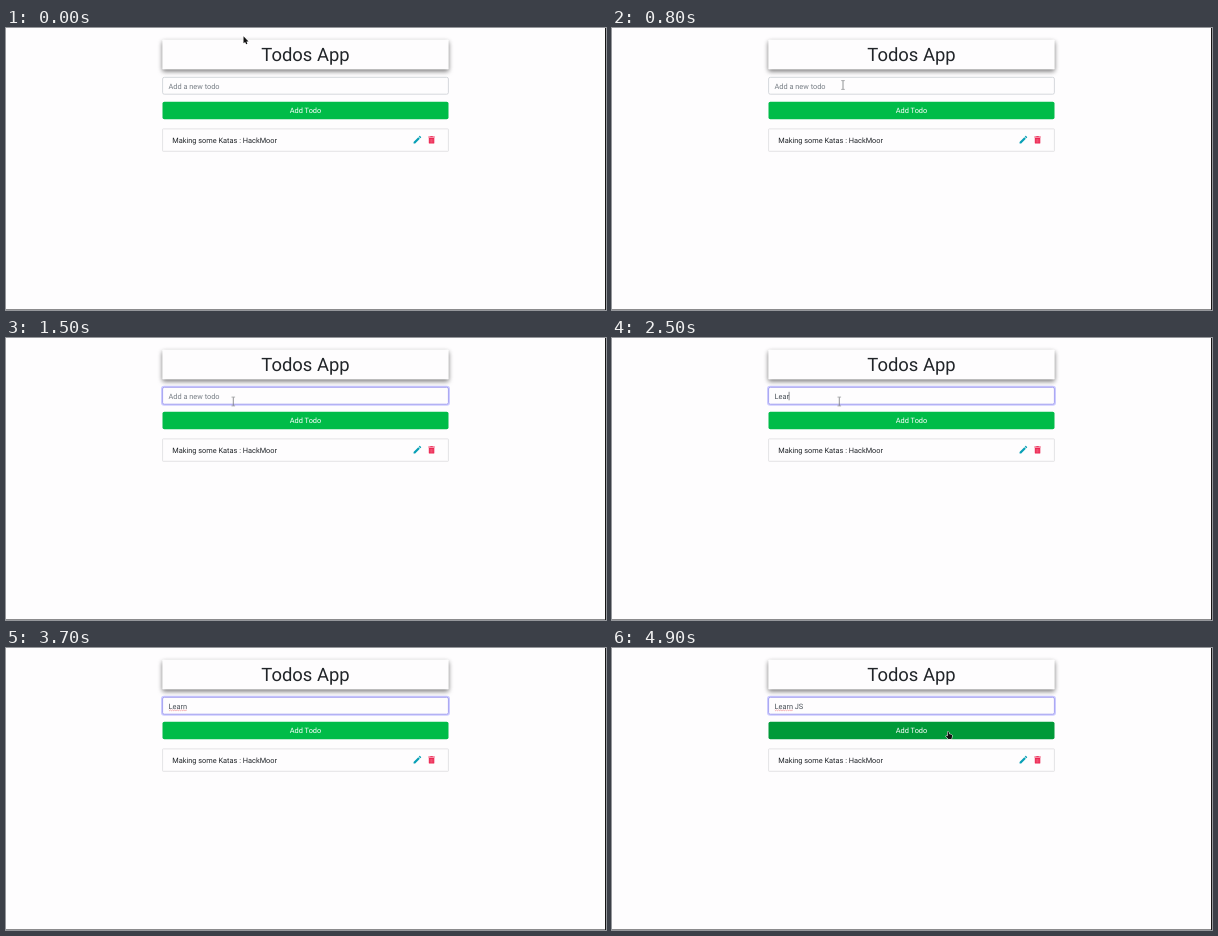
Animation of 600x282 px, one loop 5 s. Source, as an HTML page with a canvas:

```html
<!DOCTYPE html>
<html lang="en">
<head>
<meta charset="utf-8">
<title>Todos App</title>
<style>
html, body { margin: 0; width: 100%; height: 100%; overflow: hidden; background: #fefdfe; }
canvas { display: block; width: 600px; height: 282px; }
</style>
</head>
<body>
<canvas id="stage"></canvas>
<script>
const W = 600, H = 282, LOOP = 5000;
const canvas = document.getElementById("stage");
const ctx = canvas.getContext("2d");
const ratio = window.devicePixelRatio || 1;
canvas.width = Math.round(W * ratio);
canvas.height = Math.round(H * ratio);

const BG = "#fefdfe", INK = "#212529";
const LEFT = 156.5, WIDTH = 286, FONT = 7.38, TEXT_X = 162.5;

// Each state holds until the next one starts.
const pointer = [
  [0, "arrow", 237.5, 8.3], [100, "arrow", 238, 10.5], [200, "arrow", 238, 13],
  [500, "arrow", 237, 21], [600, "arrow", 235, 34], [700, "beam", 233, 50],
  [800, "beam", 231, 57], [900, "beam", 229, 56], [1000, "beam", 227.5, 53],
  [1100, "beam", 227.3, 63.5], [3100, "none", 0, 0],
  [4600, "arrow", 323, 102], [4700, "arrow", 326, 92.7],
  [4800, "hand", 333, 85], [4900, "hand", 334.5, 83.3]
];
const typing = [
  [0, ""], [1800, "L"], [2100, "Le"], [2300, "Lea"], [2500, "Lear"],
  [2800, "Learn"], [3200, "Learn "], [3900, "Learn J"], [4000, "Learn JS"]
];
const caret = [[0, false], [1800, true], [3700, false], [3900, true], [4400, false]];
const button = [[0, "#00bc48"], [4800, "#00ab40"], [4900, "#009a38"]];

const at = (states, t) => states.filter(s => s[0] <= t).pop();

function text(str, x, y, color, size = FONT, align = "left") {
  ctx.font = `400 ${size}px Roboto, sans-serif`;
  ctx.textAlign = align;
  ctx.fillStyle = color;
  ctx.fillText(str, x, y);
}

function box(x, y, w, h, r, fill, stroke, line = 0.7) {
  ctx.beginPath();
  ctx.roundRect(x, y, w, h, r);
  if (fill) {
    ctx.fillStyle = fill;
    ctx.fill();
  }
  if (stroke) {
    ctx.strokeStyle = stroke;
    ctx.lineWidth = line;
    ctx.stroke();
  }
}

function line(points, color, width) {
  ctx.beginPath();
  points.forEach(([x, y]) => ctx.lineTo(x, y));
  ctx.strokeStyle = color;
  ctx.lineWidth = width;
  ctx.stroke();
}

function shadowBox(dy, blur, alpha) {
  ctx.save();
  ctx.shadowColor = `rgba(0,0,0,${alpha})`;
  ctx.shadowBlur = blur * ratio;
  ctx.shadowOffsetY = dy * ratio;
  box(LEFT, 11.8, WIDTH, 29.5, 0.5, BG);
  ctx.restore();
}

function drawTitle() {
  shadowBox(2.3, 5, 0.36);
  shadowBox(1.6, 4, 0.24);
  text("Todos App", 299.5, 32.5, INK, 18.45, "center");
}

function drawInput(t) {
  const focused = t >= 1500;
  const value = at(typing, t)[1];
  if (focused) box(LEFT - 0.3, 48.9, WIDTH + 0.6, 17.6, 2, null, "rgba(135,135,255,0.42)", 2.4);
  box(LEFT + 0.1, 49.3, WIDTH - 0.2, 16.9, 1.7, BG, focused ? "#9794ec" : "#cbcfd4", 0.8);
  if (!value) {
    text("Add a new todo", TEXT_X, 60.6, "#767d84");
    return;
  }
  text(value, TEXT_X, 60.6, "#495057");
  if (at(caret, t)[1]) {
    const x = TEXT_X + ctx.measureText(value).width + 0.2;
    line([[x, 53.8], [x, 62.3]], "#343a40", 0.6);
  }
  if (t >= 3200) {
    const end = TEXT_X + ctx.measureText("Learn").width;
    const wave = [];
    for (let x = TEXT_X + 0.3, i = 0; x < end; x += 0.9, i++) wave.push([x, 61.9 + (i % 2) * 0.8]);
    line(wave, "#e9787c", 0.6);
  }
}

const pencil = new Path2D("M3 17.25V21h3.75L17.81 9.94l-3.75-3.75zM20.71 7.04c.39-.39.39-1.02 0-1.41l-2.34-2.34c-.39-.39-1.02-.39-1.41 0l-1.83 1.83 3.75 3.75z");

function drawTrash() {
  const red = "#ec2450";
  box(422.3, 108.5, 6.5, 1, 0.3, red);
  box(424.3, 107.9, 2.5, 0.9, 0.3, red);
  box(422.8, 109.9, 5.5, 5.7, [0, 0, 0.7, 0.7], red);
  [424.2, 425.55, 426.9].forEach(x => line([[x, 110.9], [x, 114.6]], "#f78ba2", 0.45));
}

function drawItem() {
  box(LEFT + 0.1, 100.9, WIDTH - 0.2, 22.4, 0.5, BG, "#dcdcdf", 0.8);
  text("Making some Katas : HackMoor", 166.2, 114.7, INK);
  ctx.save();
  ctx.translate(406.3, 106.6);
  ctx.scale(0.425, 0.425);
  ctx.fillStyle = "#08a0b6";
  ctx.fill(pencil);
  ctx.restore();
  drawTrash();
}

const shapes = {
  arrow: new Path2D("M0 0V7L1.6 5.6 2.7 8 3.9 7.4 2.9 5.2H5z"),
  hand: new Path2D("M1 .5Q1.7-.2 2.2.7L2.8 2.9 4.8 3.2Q5.8 3.5 5.6 4.8L5 7.8H1.8L-.6 5Q-.5 4 .5 4.4L1.3 5z")
};

function drawPointer(t) {
  const [, kind, x, y] = at(pointer, t);
  if (kind === "none") return;
  ctx.save();
  ctx.translate(x, y);
  if (kind === "beam") {
    const gray = "#77797c";
    line([[0, -4.2], [0, 4.2]], gray, 0.8);
    [-4.4, 4.4].forEach(v => line([[-1.8, v], [1.8, v]], gray, 0.6));
  } else {
    ctx.lineJoin = "round";
    ctx.strokeStyle = "#fff";
    ctx.lineWidth = 1;
    ctx.stroke(shapes[kind]);
    ctx.fillStyle = "#111";
    ctx.fill(shapes[kind]);
  }
  ctx.restore();
}

function draw(t) {
  ctx.setTransform(ratio, 0, 0, ratio, 0, 0);
  ctx.textRendering = "geometricPrecision";
  ctx.fillStyle = BG;
  ctx.fillRect(0, 0, W, H);
  drawTitle();
  drawInput(t);
  box(LEFT, 73.8, WIDTH, 17.5, 1.8, at(button, t)[1]);
  text("Add Todo", 299.5, 85.1, "#fff", FONT, "center");
  drawItem();
  drawPointer(t);
  ctx.fillStyle = "#8b8b8d";
  ctx.fillRect(0, 281, W, 1);
  ctx.fillStyle = "#161616";
  ctx.fillRect(599, 0, 1, H);
}

const start = performance.now();
function tick() {
  draw((performance.now() - start) % LOOP);
  requestAnimationFrame(tick);
}
tick();
</script>
</body>
</html>
```
